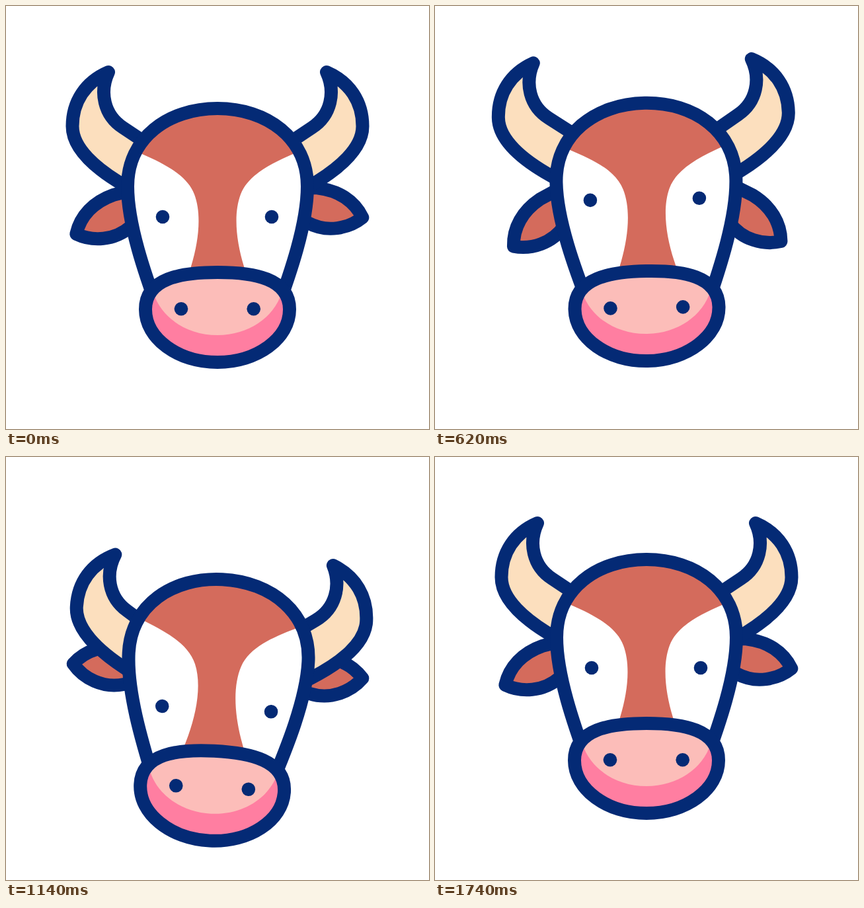
Recreate the animation shown at these times as an HTML page. Size 640 by 640 pixels, loop 2.4 s.

```html
<!DOCTYPE html>
<html lang="en">
<head>
<meta charset="utf-8">
<title>Nodding cow</title>
<style>
  html, body { margin: 0; width: 100%; height: 100%; overflow: hidden; background: #fff; }
  svg { display: block; width: 100%; height: 100%; }
  .line { stroke: #042a75; stroke-width: 20; stroke-linejoin: round; stroke-linecap: round; }
  .dot { fill: #042a75; }
  .brown { fill: #d46b5c; }
  .horn { fill: #fcdfbe; }
</style>
</head>
<body>
<svg viewBox="0 0 640 640">
  <defs>
    <path id="ear" class="line brown" d="M-111 0C-96 -24 -70 -37 -38 -37L4 -33L0 5L-30 17C-60 29 -92 19 -111 0Z"/>
    <path id="horn" class="line horn" d="M155 100C120 115 100.5 145 100.5 182C100.5 215 135 246 180 272L215 292L240 226L177 184C148 165 141 130 155 100Z"/>
    <path id="skull" d="M232 465C210 405 184 330 184 273C184 200 245 155 320 155C395 155 456 200 456 273C456 330 430 405 408 465"/>
    <path id="patch" fill="#fff" d="M170 212L206 224C240 239 274 256 285 285C296 314 292 355 280 394C272 420 262 445 255 465L170 465Z"/>
    <path id="muzzle" d="M320 403C265 403 211 412 211 459C211 503 260 539 320 539C380 539 429 503 429 459C429 412 375 403 320 403Z"/>
    <clipPath id="inSkull"><use href="#skull"/></clipPath>
    <clipPath id="inMuzzle"><use href="#muzzle"/></clipPath>
  </defs>

  <g data-part="head">
    <g id="earL"><use href="#ear"/></g>
    <g transform="matrix(-1 0 0 1 640 0)"><g id="earR"><use href="#ear"/></g></g>
  </g>
  <g data-part="horns">
    <use href="#horn"/>
    <use href="#horn" transform="matrix(-1 0 0 1 640 0)"/>
  </g>
  <g data-part="head">
    <use href="#skull" class="brown"/>
    <g clip-path="url(#inSkull)">
      <use href="#patch"/>
      <use href="#patch" transform="matrix(-1 0 0 1 640 0)"/>
    </g>
    <use href="#skull" class="line" fill="none"/>
  </g>
  <g data-part="eyes" class="dot">
    <circle cx="237" cy="319" r="10.3"/>
    <circle cx="402" cy="319" r="10.3"/>
  </g>
  <g data-part="snout">
    <use href="#muzzle" fill="#ff7ea1"/>
    <path clip-path="url(#inMuzzle)" fill="#fcbdb9" d="M223 434C235 472 274 498 320 498C366 498 405 472 417 434L417 395L223 395Z"/>
    <use href="#muzzle" class="line" fill="none"/>
    <circle class="dot" cx="265" cy="458.3" r="10.3"/>
    <circle class="dot" cx="374.7" cy="458.3" r="10.3"/>
  </g>
</svg>
<script>
  const LOOP = 2400, STEP = 20;
  const DIP = 355, RISE = 780, DIP2 = 1180, REST = 1640;

  const ease = (t, from, to) => {
    const u = Math.min(1, Math.max(0, (t - from) / (to - from)));
    return u * u * (3 - 2 * u);
  };

  // One nod: rest, dip, rise, second dip, rest. The lag builds up after the first dip.
  const swing = (dip, rise, dip2, lag = 0, rest = 0) => t => {
    const first = DIP + 0.3 * lag;
    return rest
      + (dip - rest) * ease(t, 0, first)
      + (rise - dip) * ease(t, first, RISE + lag)
      + (dip2 - rise) * ease(t, RISE + lag, DIP2 + lag)
      + (rest - dip2) * ease(t, DIP2 + lag, REST + lag);
  };

  const tilt = swing(5.7, -4.6, 3.2, 10);
  const sway = swing(0, -3.5, 0);
  const drop = {
    head: swing(45, -36, 33, 10),
    horns: swing(68, -70, 66, 28),
    eyes: swing(66, -70, 66),
    snout: swing(66, -64, 66, 70)
  };
  // Ear droop in degrees; the two ears rest at different angles.
  const ears = {
    earL: swing(-4, 50, -9, 0, 19.4),
    earR: swing(-4, 50, -9, 0, 6.2)
  };

  const parts = [...document.querySelectorAll("[data-part]")];
  const start = performance.now();

  function draw() {
    const t = Math.floor((performance.now() - start) % LOOP / STEP) * STEP;
    for (const g of parts) {
      const name = g.dataset.part;
      const x = name === "head" ? 0 : sway(t);
      g.setAttribute("transform", `translate(${x} ${drop[name](t)}) rotate(${tilt(t)} 320 304)`);
    }
    for (const id in ears) {
      document.getElementById(id).setAttribute("transform", `translate(211 308) rotate(${-ears[id](t)})`);
    }
    requestAnimationFrame(draw);
  }
  draw();
</script>
</body>
</html>
```
